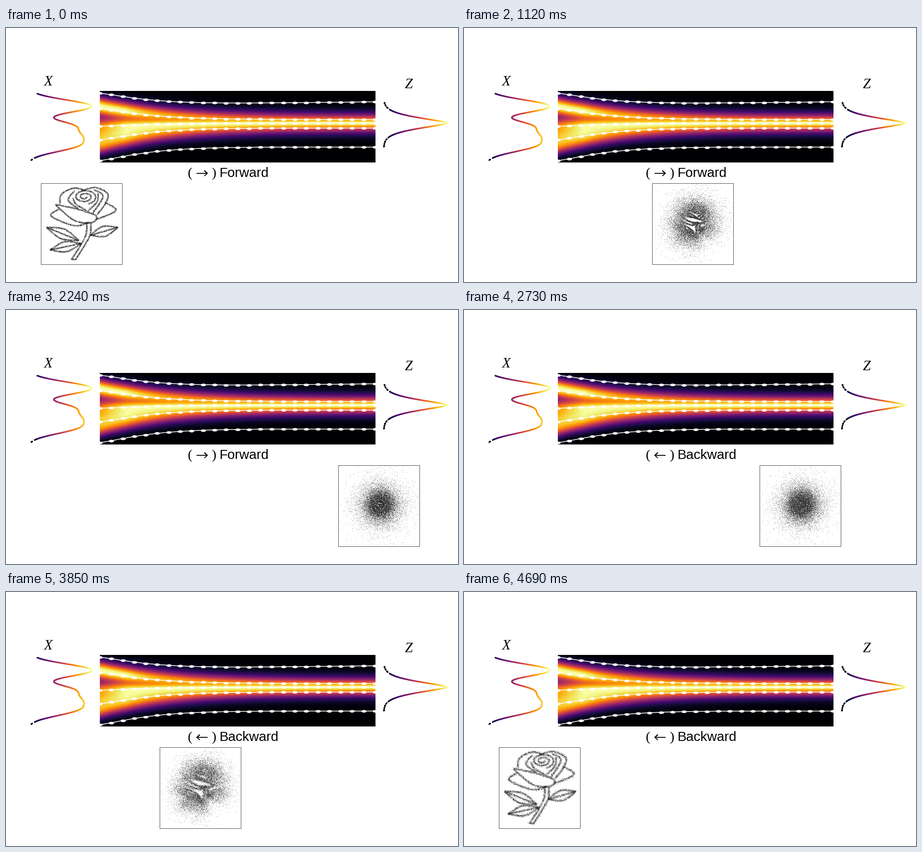
A matplotlib script for the animation above (4970 ms loop, 997x561 px).

```python
import numpy as np
import matplotlib.pyplot as plt
from matplotlib.animation import FuncAnimation
from matplotlib.collections import LineCollection
from matplotlib.patches import Rectangle
from matplotlib.path import Path
from matplotlib.transforms import Affine2D

W, H, DPI = 997, 561, 100
PX = 72 / DPI
TICK, TICKS = 70, 71
SIGMA, CENTER = 0.125, np.array([0.515, 0.49])
X0, X1 = 207, 814.5                                 # flow panel, left and right
STOPS = [77, 155, 235, 339, 415, 499, 571, 652, 733]  # card positions
CARD_TOP, CARD = 343, 179
rng = np.random.default_rng(4)


# --- densities and flow ---------------------------------------------------

def x_density(y):
    return (np.exp(-((y - 173) / 14) ** 2 / 2)
            + 0.55 * np.exp(-((y - 214) / 11) ** 2 / 2)
            + 0.87 * np.exp(-np.abs((y - 249) / 28.4) ** 2.69))


def z_density(y):
    return np.exp(-np.abs((y - 210) / 16.9) ** 1.5)


def quantiles(density, top, bottom, u):
    """Position and height of the density at each cumulative share u."""
    y = np.linspace(top, bottom, 2000)
    cdf = np.cumsum(density(y))
    pos = np.interp(u, (cdf - cdf[0]) / (cdf[-1] - cdf[0]), y)
    return pos, density(pos)


def settle(x, scale=115, power=1.25):
    return 1 - np.exp(-((x - X0) / scale) ** power)


def flow_image(rows=316, cols=607):
    u = np.linspace(0, 1, 3000)
    q0, d0 = quantiles(x_density, 139, 297, u)
    q1, d1 = quantiles(z_density, 150, 270, u)
    y = np.linspace(139, 297, rows)
    image = np.empty((rows, cols))
    for i, s in enumerate(settle(np.linspace(X0, X1, cols), 140, 1)):
        height = (1 - s) * d0 + s * d1
        image[:, i] = np.interp(y, (1 - s) * q0 + s * q1, height / height.max(), 0, 0)
    return image


# --- rose as a cloud of points --------------------------------------------

def spline(points, n=24):
    p = np.array(points, float)
    p = np.vstack([p[:1], p, p[-1:]])
    t = np.linspace(0, 1, n)[:, None]
    return np.vstack([
        0.5 * (2 * b + (c - a) * t + (2 * a - 5 * b + 4 * c - d) * t**2
               + (3 * b - a - 3 * c + d) * t**3)
        for a, b, c, d in zip(p, p[1:], p[2:], p[3:])])


def leaf(base, tip, bulge=11):
    base, tip = np.array(base), np.array(tip)
    dx, dy = tip - base
    normal = np.array([-dy, dx]) / np.hypot(dx, dy)
    return [spline([base, (base + tip) / 2 + k * bulge * normal, tip]) for k in (-1, 0, 1)]


def spiral(cx, cy, turns=2.2):
    f = np.linspace(0, 1, 120)
    angle, r = 2 * np.pi * turns * f, 4 + 22 * f
    return np.c_[cx + r * np.cos(angle), cy + 0.62 * r * np.sin(angle)]


def sample(line, per_px=8.5, radius=2.0):
    arc = np.r_[0, np.cumsum(np.hypot(*np.diff(line, axis=0).T))]
    n = int(arc[-1] * per_px)
    at = rng.uniform(0, arc[-1], n)
    angle, r = rng.uniform(0, 2 * np.pi, n), radius * np.sqrt(rng.uniform(0, 1, n))
    return np.c_[np.interp(at, arc, line[:, 0]) + r * np.cos(angle),
                 np.interp(at, arc, line[:, 1]) + r * np.sin(angle)]


def rose_points():
    petals = [
        [(118, 391), (121, 370), (148, 356), (172, 361)],
        [(168, 361), (196, 355), (222, 368), (217, 390), (199, 414)],
        [(109, 392), (152, 401), (196, 416), (188, 431), (150, 427), (109, 393)],
        [(116, 402), (99, 417), (149, 438), (181, 431)],
        [(216, 387), (240, 405), (196, 425)],
        [(150, 362), (136, 382), (158, 401)],
        [(193, 360), (212, 374), (190, 410)],
        [(147, 378), (153, 391), (176, 405)],
        [(201, 367), (199, 386), (179, 406)],
    ]
    stem = spline([(181, 432), (180, 455), (171, 475), (148, 512)])
    lines = [spline(p) for p in petals] + [spiral(172, 375)]
    lines += [stem - (4.5, 0), stem + (4.5, 0), np.array([(143, 512), (153, 512)])]
    lines += leaf((159, 470), (89, 442)) + leaf((164, 477), (97, 491)) + leaf((184, 459), (244, 442))
    return (np.vstack([sample(line) for line in lines]) - (77, 345)) / 177


def gaussianize(points, rounds=90, rate=0.3):
    """Carry the points to a normal cloud by sliced optimal transport."""
    q = points - CENTER
    ref = np.sort(rng.normal(0, SIGMA, len(q)))
    for angle in rng.uniform(0, np.pi, rounds):
        c, s = np.cos(angle), np.sin(angle)
        rot = np.array([[c, -s], [s, c]])
        r = q @ rot
        for axis in (0, 1):
            order = np.argsort(r[:, axis])
            r[order, axis] += rate * (ref - r[order, axis])
        q = r @ rot.T
    # thin outskirts diffuse more than the core
    spread = 1.2 * (q**2).sum(axis=1, keepdims=True)
    return CENTER + q + spread * rng.normal(size=q.shape)


rose = rose_points()
cloud = gaussianize(rose)
blur = rng.laplace(0, 1, rose.shape)


# --- stage ----------------------------------------------------------------

fig = plt.figure(figsize=(W / DPI, H / DPI), dpi=DPI, facecolor="white")
ax = fig.add_axes([0, 0, 1, 1])
ax.axis("off")
ax.imshow(flow_image(), cmap="inferno", vmin=0, vmax=1, aspect="auto",
          extent=(X0, X1, 297, 139), interpolation="bilinear")
ax.set(xlim=(0, W), ylim=(H, 0))

panel = Rectangle((X0, 139), X1 - X0, 158, transform=ax.transData)
oval = Path.unit_circle().transformed(Affine2D().scale(1, 0.5))
beads = np.linspace(X0, 814, 25)
for start, end, drift in ((144, 170, -7), (178, 201.5, 0.5), (217, 210, 0),
                          (247, 221, 0), (293, 262.5, 0.5)):
    ys = start + (end - start) * settle(beads) + drift * (beads - X0) / (X1 - X0)
    line, = ax.plot(beads, ys, color="white", lw=1.6 * PX, marker=oval, ms=11.5 * PX, mew=0)
    line.set_clip_path(panel)


def density_curve(density, base, width, top, bottom):
    """Outline coloured by height, dashed where it runs out."""
    y = np.linspace(top, bottom, 500)
    value = density(y)
    points = np.c_[base + width * value, y]
    pairs = np.stack([points[:-1], points[1:]], axis=1)
    keep = ((value > 0.1) | (y % 5 < 2))[:-1]
    curve = LineCollection(pairs[keep], cmap="inferno", lw=3.2 * PX, capstyle="round")
    curve.set_array(value[:-1][keep])
    curve.set_clim(0, 1)
    ax.add_collection(curve)


density_curve(x_density, 50, 139, 145, 292)
density_curve(z_density, 833, 140, 163, 263)


def label(x, y, text, font, px, **kw):
    return ax.text(x, y, text, family=font, fontsize=px * PX, color="black",
                   va="baseline", **kw)


label(92, 126.5, "X", "Liberation Serif", 31, style="italic", ha="center")
label(888, 132.5, "Z", "Liberation Serif", 31, style="italic", ha="center")
label(400.5, 328.5, "(", "Liberation Serif", 30)
label(454, 328.5, ")", "Liberation Serif", 30)
title = label(470, 329, "", "Liberation Sans", 29.7)
arrow, = ax.plot([], [], color="black", lw=1.9 * PX, solid_capstyle="round")
dots, = ax.plot([], [], ",", color="#181818", alpha=0.36)
card = Rectangle((0, 0), CARD, CARD, fill=False, ec="#4a4a4a", lw=PX)
ax.add_patch(card)


def update(n):
    # the turning point is held one tick shorter than the other steps
    step = n // 4 if n < 36 else 10 + (n - 39) // 4
    forward = step < len(STOPS)
    stage = step if forward else 17 - step
    mix = 1 - (1 - stage / 8) ** 2
    points = (1 - mix) * rose + mix * cloud
    if not forward:
        points = points + (0.004 + 0.005 * mix) * blur
    points = points[((points > 0.01) & (points < 0.99)).all(axis=1)]
    left = STOPS[stage]
    dots.set_data(left + CARD * points[:, 0], CARD_TOP + CARD * points[:, 1])
    card.set_xy((left, CARD_TOP))

    title.set_text("Forward" if forward else "Backward")
    side = 1 if forward else -1
    arrow.set_data(432.5 + side * np.array([-11.5, 11.5, 5.5, 11.5, 5.5]),
                   321 + np.array([0, 0, -5.5, 0, 5.5]))
    return dots, card, title, arrow


anim = FuncAnimation(fig, update, frames=TICKS, interval=TICK, repeat=True, repeat_delay=0)
plt.show()
```
